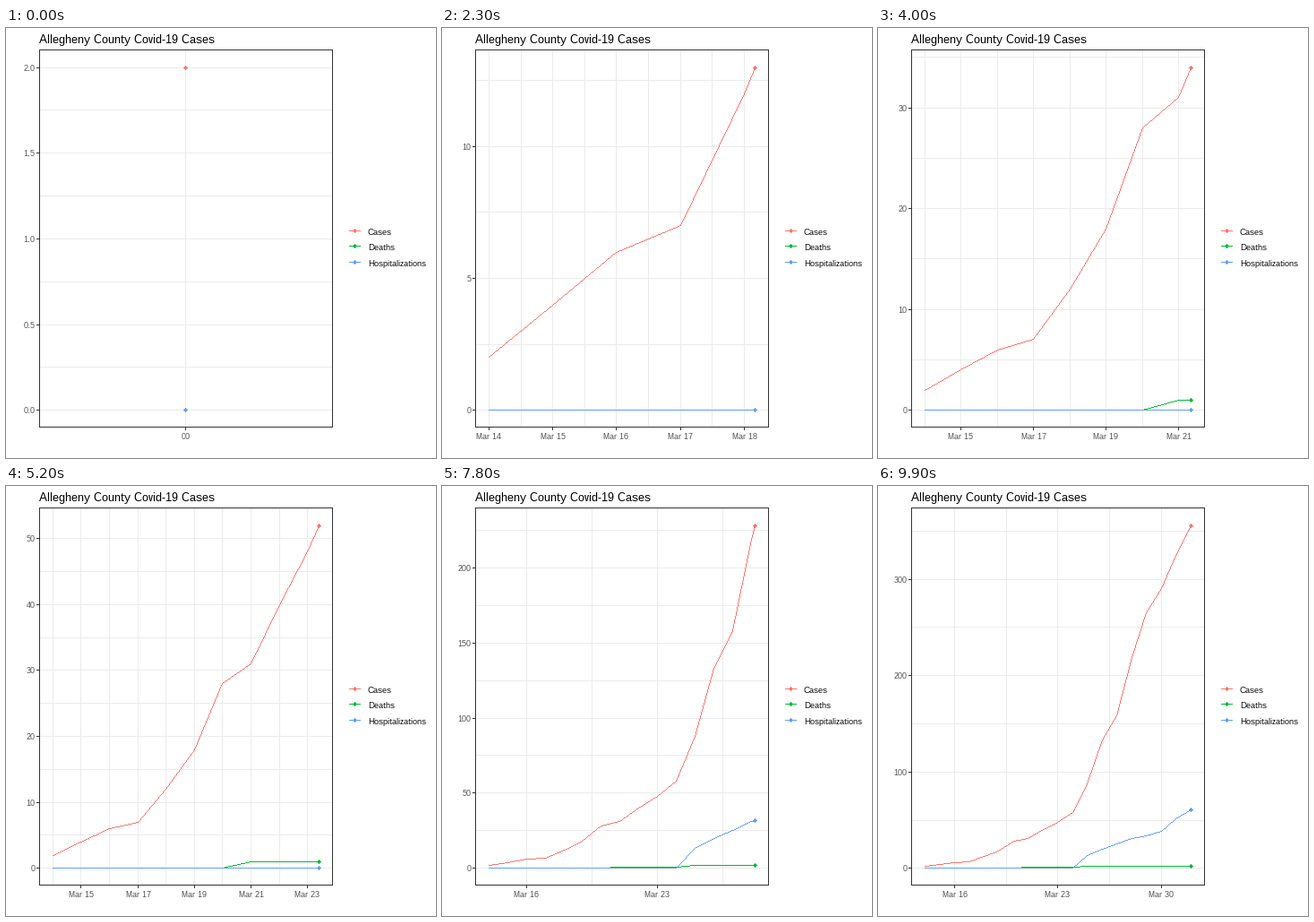
A matplotlib script for the animation above (10000 ms loop, 480 by 480 pixels).

```python
import numpy as np
import matplotlib.pyplot as plt
from matplotlib.animation import FuncAnimation
from matplotlib.collections import PolyCollection

SIZE, FRAMES, INTERVAL = 480, 100, 100
PT = 0.72  # points per pixel at 100 dpi
LEFT, RIGHT, TOP, BOTTOM = 37, 363.8, 24.4, 445.4
GRID, EDGE, TICK_TEXT = "#EBEBEB", "#333333", "#4D4D4D"

# Daily totals from March 14 to April 1
SERIES = {
    "Cases": ("#F8766D", [2, 4, 6, 7, 12, 18, 28, 31, 40, 48, 58, 88, 133,
                          158, 219, 265, 290, 325, 356]),
    "Deaths": ("#00BA38", [0] * 7 + [1] * 4 + [2] * 8),
    "Hospitalizations": ("#619CFF", [0] * 11 + [13, 20, 25, 31, 34, 38, 51, 61]),
}
DAYS = np.arange(19)
DAY_FRAMES = np.round(DAYS * (FRAMES - 1) / 18)
FIRST_DAY = 14

plt.rcParams.update({"font.family": "Liberation Sans",
                     "text.hinting": "native", "text.hinting_factor": 1})
fig = plt.figure(figsize=(4.8, 4.8), dpi=100, facecolor="white")
ax = fig.add_axes([0, 0, 1, 1])
ax.set_xlim(0, SIZE)
ax.set_ylim(SIZE, 0)
ax.axis("off")


def pixel(v):
    return np.floor(np.asarray(v, float) + 0.5).astype(int)


def blocks(rects, color, z):
    """Hard-edged boxes; each rect gives its first and last pixel."""
    verts = [[(a, b), (c + 1, b), (c + 1, d + 1), (a, d + 1)]
             for a, b, c, d in pixel(rects)]
    return ax.add_collection(
        PolyCollection(verts, facecolors=color, edgecolors="none", linewidths=0,
                       antialiaseds=False, zorder=z), autolim=False)


def polyline(x, y, color, z):
    """One-pixel line without smoothing."""
    x, y = pixel(x), pixel(y)
    cells = set()
    for x0, y0, x1, y1 in zip(x, y, x[1:], y[1:]):
        n = max(abs(x1 - x0), abs(y1 - y0)) + 1
        cells.update(zip(pixel(np.linspace(x0, x1, n)),
                         pixel(np.linspace(y0, y1, n))))
    return blocks([(a, b, a, b) for a, b in sorted(cells)], color, z)


def dot(x, y, color, z):
    x, y = pixel(x), pixel(y)
    return blocks([(x - r, y - 2 + r, x + r, y + 2 - r) for r in range(3)], color, z)


def label(x, y, s, px, color="black", ha="left"):
    return ax.text(x, y, s, fontsize=px * PT, color=color, ha=ha, va="baseline")


def value_breaks(lo, hi, m=5):
    """Extended Wilkinson labelling."""
    nice = [1, 5, 2, 2.5, 4, 3]
    span = hi - lo
    best, found = -2, None
    decade = int(np.floor(np.log10(span)))
    for i, q in enumerate(nice):
        for k in range(2, 11):
            for z in range(decade - 2, decade + 2):
                step = q * 10.0 ** z
                first = int(np.floor(hi / step)) - (k - 1)
                last = int(np.ceil(lo / step))
                for start in range(first, last + 1):
                    a, b = start * step, (start + k - 1) * step
                    simple = 1 - i / 5 - 1 + (a <= 0 <= b)
                    cover = 1 - 0.5 * ((hi - b) ** 2 + (lo - a) ** 2) / (0.1 * span) ** 2
                    ratio = (k - 1) / (b - a) * (max(b, hi) - min(a, lo)) / (m - 1)
                    dense = 2 - max(ratio, 1 / ratio)
                    score = 0.25 * simple + 0.2 * cover + 0.5 * dense + 0.05
                    if score > best + 1e-9:
                        best, found = score, a + step * np.arange(k)
    return found


def date_breaks(lo, hi, n=5):
    """Daily, two-day or weekly (Monday) breaks, whichever comes nearest to n."""
    steps = [(1, 0), (2, 1), (7, 2)]

    def ticks(i):
        step, anchor = steps[i]
        a = np.floor((lo - anchor) / step)
        b = np.ceil((hi - anchor) / step)
        return anchor + step * np.arange(a, b + 1)

    if hi - lo <= n:
        return ticks(0)
    i = int(np.argmin([abs((hi - lo) / s - n) for s, _ in steps]))
    at = ticks(i)
    count = len(at) - 1
    if count == n:
        return at
    other = ticks(min(i + 1, 2) if count > n else max(i - 1, 0))
    return other if abs(len(other) - 1 - n) < abs(count - n) else at


def inside(v, lo, hi):
    return v[(v >= lo) & (v <= hi)]


def minor_breaks(b, lo, hi):
    if len(b) < 2:
        return np.array([])
    step = b[1] - b[0]
    return inside(np.append(b - step / 2, b[-1] + step / 2), lo, hi)


def date_text(day):
    return f"Mar {day:02.0f}" if day <= 31 else f"Apr {day - 31:02.0f}"


def draw_static():
    blocks([(LEFT, TOP, RIGHT, TOP), (LEFT, BOTTOM, RIGHT, BOTTOM),
            (LEFT, TOP, LEFT, BOTTOM), (RIGHT, TOP, RIGHT, BOTTOM)], EDGE, 6)
    label(37, 17, "Allegheny County Covid-19 Cases", 13)
    for (name, (color, _)), y in zip(SERIES.items(), (226, 243, 261)):
        blocks([(383, y, 395, y)], color, 3)
        dot(389, y, color, 4)
        label(404, y + 5, name, 9)


moving = []


def draw(frame):
    while moving:
        moving.pop().remove()

    now = np.interp(frame, DAY_FRAMES, DAYS)
    top = np.interp(now, DAYS, SERIES["Cases"][1])
    pad_x, pad_y = (RIGHT - LEFT) / 22, (BOTTOM - TOP) / 22

    def to_x(day):
        if now == 0:
            return np.full(np.shape(day), (LEFT + RIGHT) / 2)
        return LEFT + pad_x + np.asarray(day) / now * 20 * pad_x

    def to_y(value):
        return BOTTOM - pad_y - np.asarray(value) / top * 20 * pad_y

    y_lim = (-0.05 * top, 1.05 * top)
    y_major = inside(value_breaks(*y_lim), *y_lim)
    y_minor = minor_breaks(y_major, *y_lim)
    if now == 0:
        x_major, x_minor, x_text = np.array([FIRST_DAY]), np.array([]), ["00"]
    else:
        x_lim = (FIRST_DAY - 0.05 * now, FIRST_DAY + 1.05 * now)
        x_major = inside(date_breaks(*x_lim), *x_lim)
        x_minor = minor_breaks(x_major, *x_lim)
        x_text = [date_text(d) for d in x_major]

    x_ticks, y_ticks = to_x(x_major - FIRST_DAY), to_y(y_major)
    columns = np.append(to_x(x_minor - FIRST_DAY), x_ticks)
    rows = np.append(to_y(y_minor), y_ticks)
    moving.append(blocks([(x, TOP, x, BOTTOM) for x in columns]
                         + [(LEFT, y, RIGHT, y) for y in rows], GRID, 1))
    moving.append(blocks([(x, 446, x, 448) for x in x_ticks]
                         + [(34, y, 36, y) for y in y_ticks], EDGE, 5))

    for x, text in zip(x_ticks, x_text):
        moving.append(label(pixel(x) + 0.5, 459, text, 9, TICK_TEXT, "center"))
    digits = 0 if np.allclose(y_major, np.round(y_major)) else 1
    for value, y in zip(y_major, y_ticks):
        moving.append(label(32.5, pixel(y) + 4, f"{abs(value):.{digits}f}", 9,
                            TICK_TEXT, "right"))

    days = np.append(DAYS[DAYS < now], now)
    for color, totals in SERIES.values():
        xs, ys = to_x(days), to_y(np.interp(days, DAYS, totals))
        if len(days) > 1:
            moving.append(polyline(xs, ys, color, 3))
        moving.append(dot(xs[-1], ys[-1], color, 4))
    return moving


draw_static()
anim = FuncAnimation(fig, draw, frames=FRAMES, interval=INTERVAL,
                     init_func=lambda: draw(0), repeat=True, repeat_delay=0,
                     blit=False)
plt.show()
```
